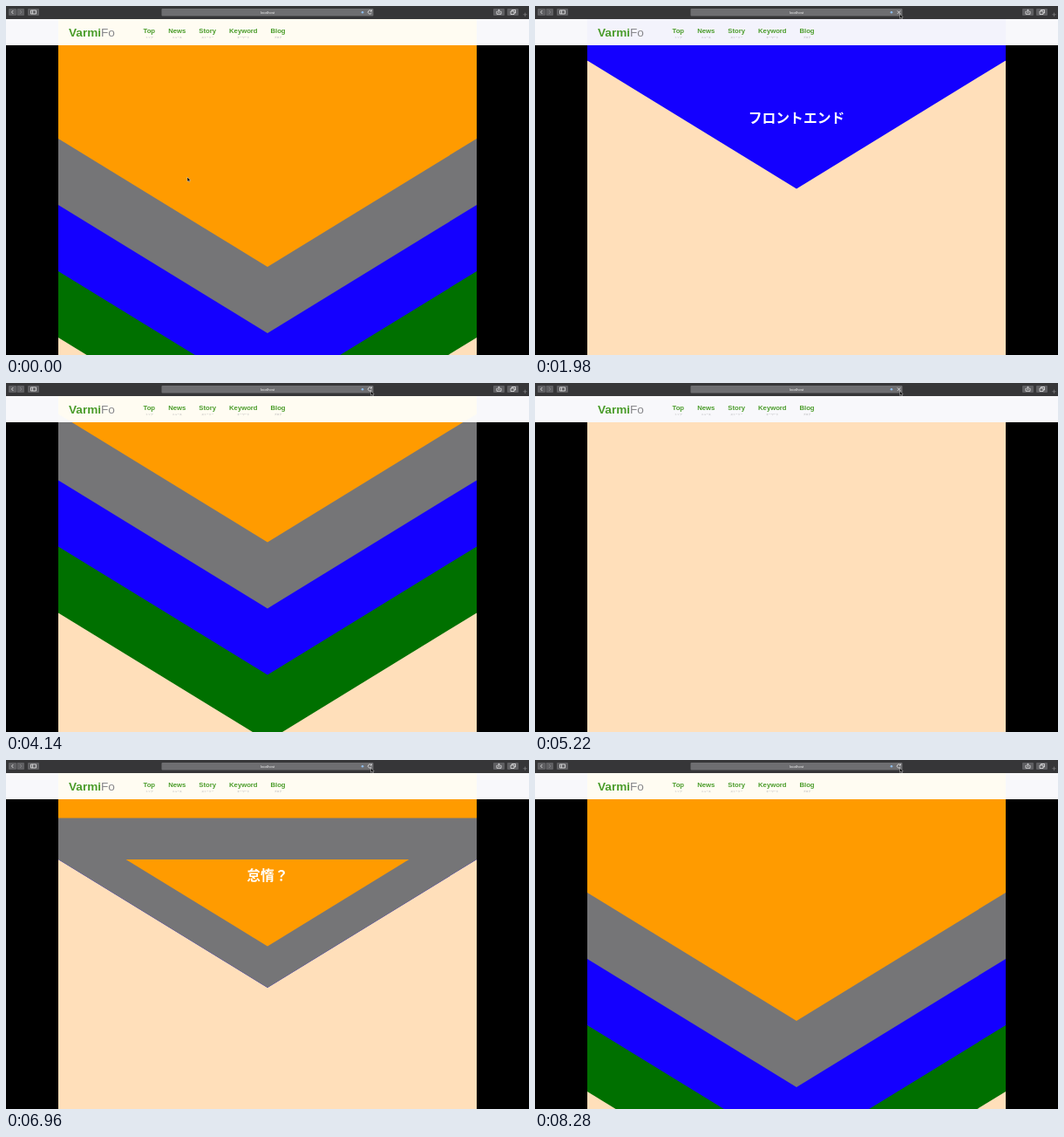
These frames come from a looping animation (600x400 px, 8520 ms). An HTML page:

```html
<!DOCTYPE html>
<html lang="ja">
<head>
<meta charset="utf-8">
<title>Stacked slides</title>
<style>
html, body { margin: 0; width: 100%; height: 100%; overflow: hidden; background: #000; }
svg { display: block; width: 600px; height: 400px; }
.ui { font-family: "Liberation Sans", Arial, sans-serif; }
.nav { font-size: 7.7px; font-weight: 700; fill: #4a9c2a; text-anchor: middle; }
.sub { font: 2.8px "Noto Sans CJK JP", "Noto Sans CJK", sans-serif; fill: #a6a6aa; text-anchor: middle; }
.title { font: 700 15.8px "Noto Sans CJK JP", "Noto Sans CJK", sans-serif; fill: #fff; text-anchor: middle; }
</style>
</head>
<body>
<svg viewBox="0 0 600 400">
  <defs>
    <clipPath id="page"><rect x="60" y="15" width="480" height="385"/></clipPath>
    <clipPath id="bar"><rect x="60" y="15" width="480" height="30"/></clipPath>
  </defs>
  <rect width="600" height="400"/>
  <rect x="60" y="15" width="480" height="385" fill="#ffdfba"/>
  <g id="content" clip-path="url(#page)"></g>
  <rect y="15" width="600" height="30" fill="#f8f8fb"/>
  <g id="tint" clip-path="url(#bar)"></g>
  <g id="head" class="ui">
    <text x="72" y="35.3" font-size="13.6" font-weight="700" fill="#4a9c2a">Varmi<tspan font-weight="400" fill="#88888c">Fo</tspan></text>
  </g>
  <g class="ui">
    <rect width="600" height="15" fill="#363638"/>
    <g fill="#5f5f62">
      <rect x="3" y="3" width="9" height="8" rx="1"/>
      <rect x="12.5" y="3" width="8.5" height="8" rx="1"/>
      <rect x="25" y="3" width="13" height="8" rx="1"/>
      <rect x="559" y="3" width="13" height="8" rx="1"/>
      <rect x="575" y="3" width="13" height="8" rx="1"/>
      <rect x="178.5" y="3" width="243" height="8.5" rx="1" fill="#6e6e71"/>
    </g>
    <g fill="none" stroke="#e6e6e8" stroke-width=".8">
      <path d="M8.3 5 6.5 7 8.3 9"/>
      <path d="M16 5l1.8 2L16 9" stroke="#88888b"/>
      <path d="M28.5 5h6v4h-6zM30.5 5v4"/>
      <path d="M564 6.3h-1v3h5v-3h-1M565.5 8V4.3m-1.2 1 1.2-1 1.2 1"/>
      <path d="M579 6h4v3.5h-4zM580.5 6V4.5h4V8H583"/>
      <path d="M595.5 7.6v4.4M593.3 9.8h4.4" stroke="#8e8e91" stroke-width=".6"/>
      <path id="reload" d="M419 5.6A2.1 2.1 0 1 0 419.3 8M419.4 4.4v1.6h-1.6"/>
      <path id="stop" d="M415.8 5.4l3.4 3.6M419.2 5.4 415.8 9"/>
    </g>
    <circle cx="409" cy="7.3" r="1.3" fill="#8fbbe8"/>
    <text x="300" y="8.8" font-size="4.1" fill="#f6f6f6" text-anchor="middle">localhost</text>
  </g>
  <path id="cursor" d="M0 0v5.2l1.2-1 .9 1.9.9-.4-.9-1.8h1.6z" stroke="#fff" stroke-width=".4"/>
</svg>
<script>
const LOOP = 8520, STEP = 60;
const REST = 261, ROOF = 147, BAND = 76;
const BLUE = '#1400ff', GRAY = '#757577', ORANGE = '#ff9b00', GREEN = '#007000';
const PALE = { [BLUE]: '#f3f3fc', [GRAY]: '#f9f9f9', [ORANGE]: '#fffcf2', [GREEN]: '#f3f9f3' };

// Start times of each page load, its three slides and the closing stack.
const RUNS = [
  { load: 1740, slides: [1730, 2330, 2930], stack: 3691 },
  { load: 5220, slides: [5210, 6060, 6702], stack: 7450 }
];

const $ = id => document.getElementById(id);
const clamp = v => Math.max(0, Math.min(1, v));

function add(parent, tag, attrs, text = '') {
  const el = document.createElementNS('http://www.w3.org/2000/svg', tag);
  for (const k in attrs) el.setAttribute(k, attrs[k]);
  el.textContent = text;
  parent.append(el);
  return el;
}

// cubic-bezier(.25, .1, .25, 1)
function ease(x) {
  if (x <= 0 || x >= 1) return clamp(x);
  const curve = (a, b, s) => 3 * a * s * (1 - s) ** 2 + 3 * b * s * s * (1 - s) + s ** 3;
  let lo = 0, hi = 1;
  for (let i = 0; i < 24; i++) {
    const mid = (lo + hi) / 2;
    if (curve(.25, .25, mid) < x) lo = mid; else hi = mid;
  }
  return curve(.1, 1, lo);
}

[['Top', 'トップ', 164.3], ['News', 'ニュース', 196.3], ['Story', 'ストーリー', 231.2],
 ['Keyword', 'キーワード', 272.3], ['Blog', 'ブログ', 312]].forEach(([name, sub, x]) => {
  add($('head'), 'text', { class: 'nav', x, y: 31 }, name);
  add($('head'), 'text', { class: 'sub', x, y: 36.6 }, sub);
});

const content = $('content'), tint = $('tint');
const arrow = top => `M60 ${top}H540V${-ROOF}L300 0L60 ${-ROOF}Z`;
const roof = arrow(-ROOF - 2);  // reaches under its block to hide the seam
const block = `M60 ${-ROOF - BAND}H540V${-ROOF}H60Z`;

// Roofs and titles lie below every block.
const slides = [[BLUE, 'フロントエンド'], [GRAY, '思想'], [ORANGE, '怠惰？']].map(([fill, title]) => {
  const g = add(content, 'g', {});
  add(g, 'path', { d: roof, fill });
  add(g, 'text', { class: 'title', x: 300, y: -75.6 }, title);
  return { fill, parts: [g] };
});
for (const s of slides) {
  s.parts.push(add(content, 'path', { d: block, fill: s.fill }));
  s.parts.push(add(tint, 'path', { d: arrow(-ROOF - BAND), fill: PALE[s.fill] }));
}

const stack = [content, tint].map(parent => {
  const g = add(parent, 'g', {});
  [GREEN, BLUE, GRAY, ORANGE].forEach((c, i) => add(g, 'path', {
    d: arrow(-900), fill: parent === tint ? PALE[c] : c, transform: `translate(0 ${(3 - i) * BAND})`
  }));
  return g;
});

const moveY = (el, y) => el.setAttribute('transform', `translate(0 ${y.toFixed(2)})`);

function draw(t) {
  const run = RUNS.filter(r => t >= r.load).pop();

  slides.forEach((s, i) => {
    const y = run ? REST * ease((t - run.slides[i]) / 500) : 0;
    s.parts.forEach(p => moveY(p, y));
  });

  const p = run ? Math.sin(clamp((t - run.stack) / 790) * Math.PI / 2) : 1;
  const low = 3 * BAND;
  stack.forEach(g => moveY(g, -low + p * (299 + low)));

  const loading = t >= 1440 && t < 2280 || t >= 5220 && t < 5520;
  $('stop').style.display = loading ? '' : 'none';
  $('reload').style.display = loading ? 'none' : '';

  const k = clamp((t - 420) / 660), m = k * k * (3 - 2 * k);
  $('cursor').setAttribute('transform', `translate(${208 + 210.5 * m} ${196 - 187 * m})`);
}

function frame() {
  const t = performance.now() % LOOP;
  draw(Math.floor(t / STEP) * STEP);
  requestAnimationFrame(frame);
}
frame();
</script>
</body>
</html>
```
